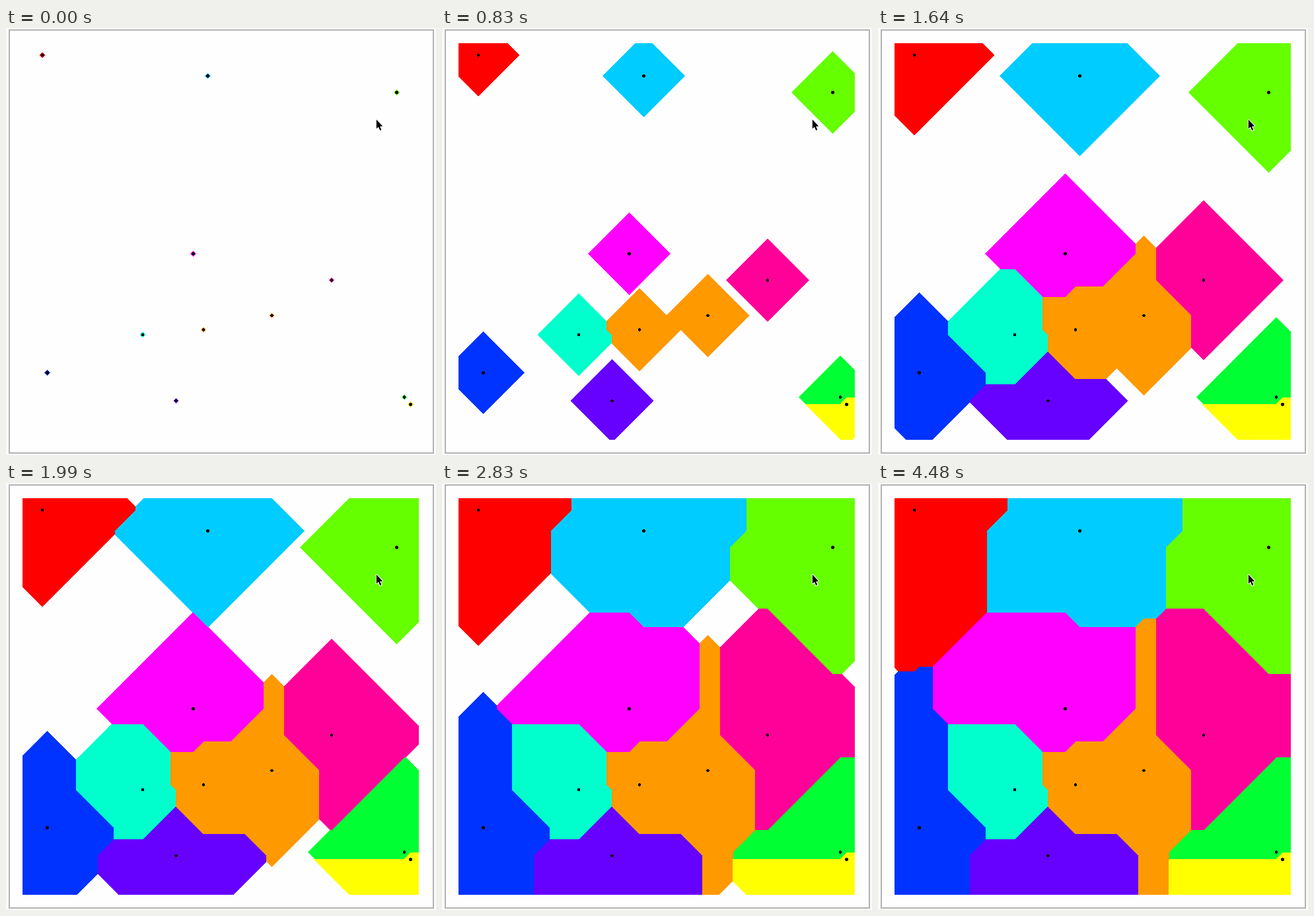
Animation, 651 px wide and 646 px high, one loop 4600 ms. Source, as a matplotlib script:

```python
import numpy as np
import matplotlib.pyplot as plt
from matplotlib.animation import FuncAnimation
from matplotlib.colors import to_rgb
from matplotlib.patches import Polygon

W, H, DPI = 651, 646, 128
LOOP, TICK = 4600, 20
STEP, LAST = 118, 38

SITES = [
    (54.5, 40.5, "#ff0000"), (305, 72, "#00ccff"), (591, 97, "#66ff00"),
    (283, 341, "#ff00ff"), (492.5, 381, "#ff0099"), (402, 434.5, "#ff9900"),
    (298.5, 456, "#ff9900"), (206.5, 463.5, "#00ffcc"), (62, 521, "#0033ff"),
    (257, 563.5, "#6600ff"), (602.5, 558, "#00ff33"), (612, 569, "#ffff00"),
]

# Radius of the growing diamonds by step; the growth stalls near the end.
RADIUS_STEPS = [0, 4, 10, 14, 21, 25, 26, 27, 28, 30, 31, 34, 36, 38]
RADII = [4.4, 37.8, 87.5, 121, 179.5, 214, 214, 238, 247, 262, 262, 267, 267, 268]


def rgb(color):
    return np.round(np.array(to_rgb(color)) * 255).astype(np.uint8)


def backdrop():
    img = np.empty((H, W, 3), np.uint8)
    img[:] = rgb("#fafafa")
    img[2:644, 4:648] = rgb("#b3b3b3")
    img[4:642, 6:646] = rgb("#fefefe")
    return img


ys, xs = np.mgrid[:H, :W]
dist = np.array([abs(xs - x) + abs(ys - y) for x, y, _ in SITES])
near = dist.min(axis=0)
cells = np.array([rgb(c) for *_, c in SITES])[dist.argmin(axis=0)]
inside = (xs >= 25) & (xs < 625) & (ys >= 23) & (ys < 623)
dots = np.any([np.hypot(xs - x, ys - y) <= 2.3 for x, y, _ in SITES], axis=0)
base = backdrop()


def render(step):
    img = base.copy()
    grown = inside & (near <= np.interp(step, RADIUS_STEPS, RADII))
    img[grown] = cells[grown]
    img[dots] = 0
    return img


fig = plt.figure(figsize=(W / DPI, H / DPI), dpi=DPI)
picture = fig.figimage(render(0), zorder=-1)

ax = fig.add_axes([0, 0, 1, 1])
ax.set(xlim=(0, W), ylim=(H, 0))
ax.axis("off")

ARROW = [(560.8, 138.5), (560.8, 152.3), (563.9, 149.6), (566.2, 154.9),
         (568.3, 154), (566.1, 148.9), (570.2, 148.6)]
ax.add_patch(Polygon(ARROW, fc="white", ec="white", lw=2.2 * 72 / DPI))
ax.add_patch(Polygon(ARROW, fc="black", ec="none"))


def update(i):
    step = min(int((i * TICK + 30) / STEP), LAST)
    picture.set_data(render(step))
    return [picture]


anim = FuncAnimation(fig, update, frames=LOOP // TICK, interval=TICK,
                     repeat=True, repeat_delay=0, blit=False)
plt.show()
```
